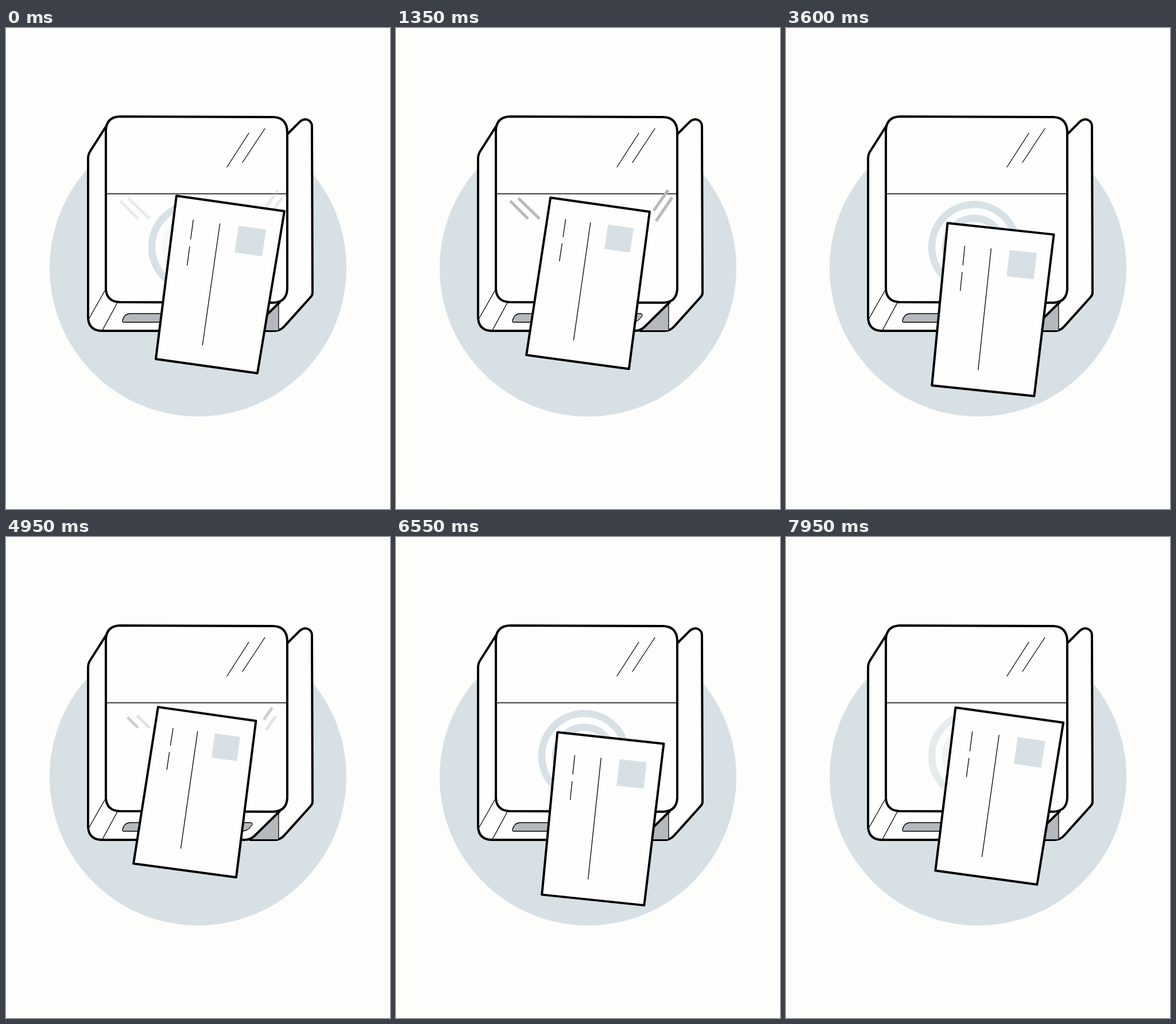
Write an HTML page that moves like this. It is 669 by 837 pixels and loops after 8 s.

```html
<!DOCTYPE html>
<html lang="en">
<head>
<meta charset="utf-8">
<title>Letter and box</title>
<style>
  html, body { margin: 0; width: 100%; height: 100%; overflow: hidden; background: #fdfdfb; }
  svg { display: block; width: 669px; height: 837px; }
  .bold, .thin { stroke: #000; stroke-linejoin: round; stroke-linecap: round; }
  .bold { stroke-width: 4; fill: #fefefe; }
  .thin { stroke-width: 1.3; fill: none; }
  .grey { fill: #b5b9bd; }
  .blue { fill: #d7e0e5; }
  .ring { fill: none; stroke: #d7e0e5; stroke-width: 12.5; }
  .ray { fill: none; stroke: #b7b9bb; stroke-width: 5; }
</style>
</head>
<body>
<svg viewBox="0 0 669 837">
  <circle class="blue" cx="334.5" cy="417.5" r="258.5"/>

  <!-- box: open flap, side and base, shaded corner, front -->
  <path class="bold" d="M490 185 L512 163 Q519 157 526 160 Q533 163 533 171 L534 461 Q534 465 530 469 L485 519 Q478 527 468 527 L425 527 L476 478 Z"/>
  <path class="grey" d="M475 478 V526 H428 Z"/>
  <path class="bold" d="M175 170 L147 214 Q143 220 143 227 V504 Q144 526 166 527 H416 Q426 527 433 520 L477 477 V170 Z"/>
  <path class="thin" d="M475 478 V526 M174 454 L145 505 M194 478 L168 526"/>
  <path class="thin grey" d="M206 512 Q202 512 203 509 Q206 497 217 497 H427 Q430 498 428 502 Q422 511 412 512 Z"/>
  <path class="bold" d="M198 154 L466 155 Q489 156 490 180 V454 Q489 477 466 478 L198 477 Q175 476 174 454 V178 Q175 155 198 154 Z"/>
  <path class="thin" d="M174 288.5 H490 M423 183 L385 242 M451 175 L412 234"/>

  <circle class="ring" cx="328" cy="381" r="74"/>
  <circle class="ring" cx="328" cy="381" r="50"/>
  <circle class="blue" id="core" cx="328" cy="381" r="29"/>
  <g id="rays"></g>

  <path class="bold" id="card"/>
  <path class="blue" id="stamp"/>
  <path class="thin" id="lines"/>
</svg>
<script>
const PERIOD = 4020, HALF = PERIOD / 2, MIDDLE = HALF / 2, LOWEST_AT = 3065;

// Card corners: top left, top right, bottom right, bottom left
const LOW  = [[237, 475], [414, 475], [416.5, 754], [235, 753.5]];
const HIGH = [[297.3, 291], [485.4, 318], [438.1, 600], [261.1, 575]];
const LEFT = [[264, 296], [434, 320], [400, 592], [221, 568]];

// Rays run from the inner end to the outer end
const RAYS = [
  [[230, 332], [199, 301]], [[250, 332], [213, 296]],
  [[449, 318], [474, 282]], [[453, 336], [481, 295]]
];

const $ = id => document.getElementById(id);
const clamp = x => Math.max(0, Math.min(1, x));
const mix = (a, b, k) => a.map((value, i) => value + (b[i] - value) * k);
const mod = (a, n) => (a % n + n) % n;
const polyline = points => "M" + points.map(p => p.map(n => n.toFixed(2))).join("L");

const [outerRing, middleRing] = document.querySelectorAll(".ring");
const rays = RAYS.map(() => {
  const ray = document.createElementNS("http://www.w3.org/2000/svg", "path");
  ray.setAttribute("class", "ray");
  return $("rays").appendChild(ray);
});

// Time since the lowest pose, running forth and back
function swing(t) {
  const phase = mod(t - LOWEST_AT, PERIOD);
  return Math.min(phase, PERIOD - phase);
}

function cardCorners(d) {
  if (d < MIDDLE) {
    const fall = (1 - d / MIDDLE) ** 1.75;
    return HIGH.map((p, i) => mix(p, LOW[i], fall));
  }
  const slide = Math.sin((d / MIDDLE - 1) * Math.PI / 2) ** 1.5;
  return HIGH.map((p, i) => mix(p, LEFT[i], slide));
}

// Maps card coordinates 0..1 onto the tilted card
function cardMap([tl, tr, br, bl]) {
  const width = (a, b) => Math.hypot(b[0] - a[0], b[1] - a[1]);
  const ratio = width(tl, tr) / width(bl, br);
  return (u, v) => mix(mix(tl, tr, u), mix(bl, br, u), v * ratio / (1 - v + v * ratio));
}

function drawCard(d) {
  const corners = cardCorners(d), at = cardMap(corners);
  const segment = (u, from, to) => polyline([at(u, from), at(u, to)]);
  $("card").setAttribute("d", polyline(corners) + "Z");
  $("stamp").setAttribute("d",
    polyline([at(.605, .12), at(.862, .12), at(.862, .279), at(.605, .279)]) + "Z");
  $("lines").setAttribute("d",
    segment(.182, .125, .238) + segment(.182, .283, .394) + segment(.431, .124, .87));
}

function drawTarget(d) {
  const BEAT = 490;
  const presence = 1 - clamp((d - 1000) / 250);
  const decay = start => 1 - .85 * mod(d - start, BEAT) / BEAT;
  const wave = .5 + .5 * Math.cos((d - 500) / BEAT * 2 * Math.PI);
  outerRing.style.opacity = Math.max(.08, presence * (.2 + .8 * wave));
  middleRing.style.opacity = presence * decay(500);
  $("core").style.opacity = presence * decay(380);
}

function drawRays(d) {
  const reach = clamp((HALF - d) / 210);
  const fade = clamp((d - 895) / 200);
  rays.forEach((ray, i) => {
    const [inner, outer] = RAYS[i];
    ray.setAttribute("d", polyline([inner, mix(inner, outer, reach)]));
    ray.style.opacity = fade * reach ** (i % 2 ? 1.8 : .7);
  });
}

function frame() {
  const d = swing(performance.now() % 8000);
  drawCard(d);
  drawTarget(d);
  drawRays(d);
  requestAnimationFrame(frame);
}
frame();
</script>
</body>
</html>
```
